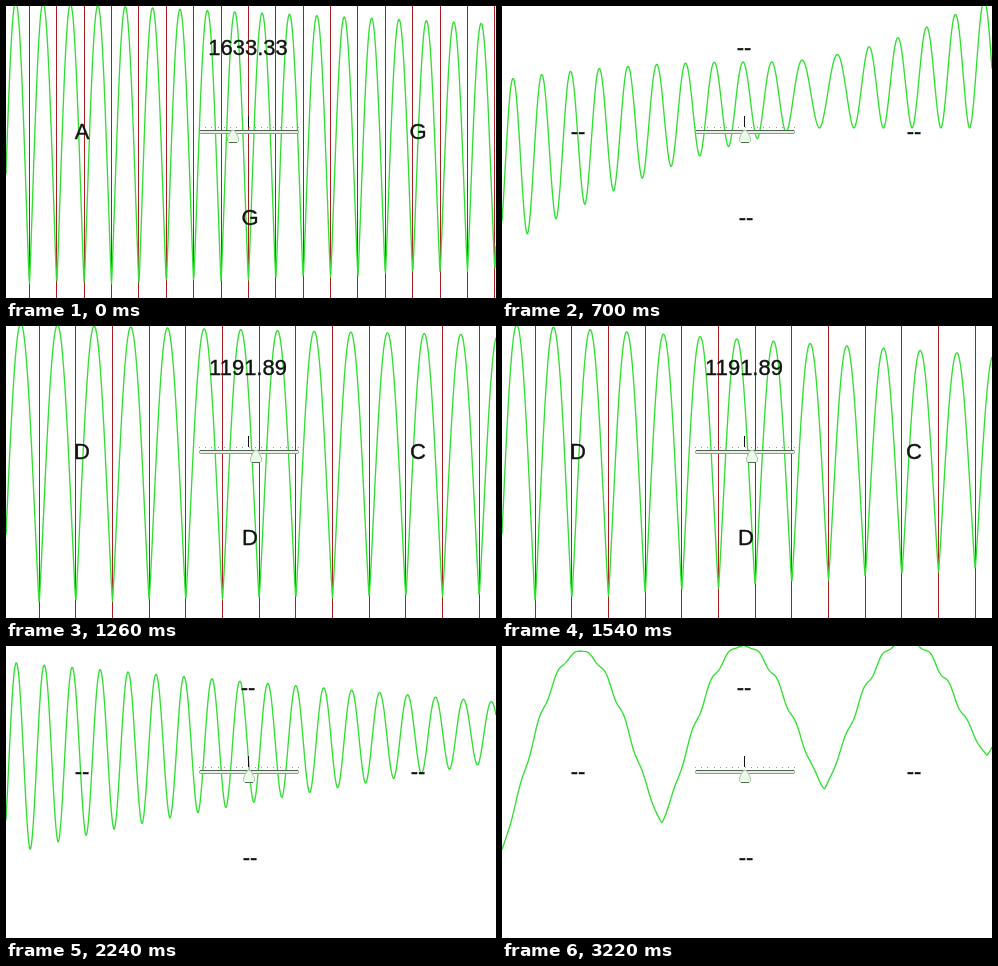
An HTML page with a canvas for the animation above (3.27 s loop, 490 px wide and 292 px high).

```html
<!DOCTYPE html>
<html lang="en">
<head>
<meta charset="utf-8">
<title>Tuner</title>
<style>
  html, body { margin: 0; width: 100%; height: 100%; overflow: hidden; background: #fff; }
  canvas { display: block; }
</style>
</head>
<body>
<canvas id="stage" width="490" height="292"></canvas>
<script>
const W = 490, H = 292, STEP = 140, LOOP = 3270;
const ctx = document.getElementById('stage').getContext('2d');
const { PI, sin, cos, abs, exp, max, min, pow } = Math;

const WAVE = '#33de33', RED = '#a81e22', INK = '#101410', GREEN_INK = '#0c640c';

const clamp = t => max(0, min(1, t));
const smooth = t => t * t * (3 - 2 * t);

// Envelopes take u, the position across the stage from 0 to 1.
const ramp = (a, b, bend = 1) => u => a + (b - a) * pow(u, bend);

// Each wave gives the height y at x; a steady tone also has a period and a first peak.
function tone(period, peak, power, top, bottom, slip = 0) {
  const y = x => {
    const late = slip * smooth(clamp((x - 280) / 85));
    const lift = pow(abs(cos(PI * (x - peak - late) / period)), power);
    const low = bottom(x / W);
    return low + (top(x / W) - low) * lift;
  };
  return { y, period, peak };
}

const loud = (period, peak, top, bottom) => tone(period, peak, 1.15, top, bottom);
const soft = (period, peak, top, bottom) => tone(period, peak, 1.8, top, bottom);

// Two close pitches: a carrier whose swell changes sign at every node.
function beats(node) {
  const y = x => {
    const turn = PI * (x - node) / 180;
    const swell = sin(turn - 0.45 * sin(turn) ** 2);
    const size = 64 + 40 * exp(-x / 12);
    const mid = 48 + 30 * x / W + 8 * swell ** 4 + 60 * exp(-x / 15);
    return mid - size * swell * cos(2 * PI * (x - node - 10) / 10.87);
  };
  return { y };
}

function rippled(base, size) {
  const y = x => {
    const slope = sin(2 * PI * (x - base.peak) / base.period);
    return base.y(x) - size * slope * sin(2 * PI * (x - 137) / 19.1);
  };
  return { y };
}

const highStart = loud(27.38, 9.7, ramp(-5, 18), ramp(279, 264, 1.8));
const highNext = loud(27.38, 9.7, ramp(-6, 25), ramp(278, 256, 1.6));
const highFade = loud(27.48, 9.7, ramp(-6, 32), ramp(277, 247, 1.6));

const calm = soft(28.75, 11, ramp(30, 66), ramp(196, 124, 0.8));
const rise = tone(28.75, 11, 1.8,
  u => 56 + 18 * max(0, 1 - 2 * u) ** 2 - 66 * pow(max(0, u - 0.55) / 0.45, 1.8),
  u => 122 + 120 * pow(max(0, 1 - u / 0.65), 1.5),
  11);

const dStart = loud(36.67, 14.8, ramp(-5, 1), ramp(284, 278));
const dTone = loud(36.67, 14.8, ramp(-3, 9, 0.8), ramp(279, 270, 0.6));
const dNext = loud(36.67, 14.8, ramp(-2, 18), ramp(278, 256));
const dFade = loud(36.67, 14.8, ramp(-2, 29), ramp(278, 242));
const dCalm = soft(36.67, 14.8, ramp(20, 60), ramp(210, 126, 0.8));

const gTone = loud(27.95, 10.3, u => 19 - 22 * (1 - u / 0.72) ** 2, ramp(291, 226, 0.9));
const gFade = loud(27.95, 10.3, ramp(-2, 33, 0.7), ramp(284, 202, 0.9));
const gCalm = soft(27.95, 10.3, ramp(16, 56), ramp(212, 116, 0.8));

const slow = rippled(tone(162.6, 78.5, 1.2, ramp(8, -9), ramp(210, 108)), 3.5);

const HIGH_G = { hz: '1633.33', left: 'A', right: 'G', low: 'G', thumb: 227 };
const D = { hz: '1191.89', left: 'D', right: 'C', low: 'D', thumb: 250 };
const G = { hz: '1575.00', left: 'G', right: 'F', low: 'G', thumb: 243 };
const NONE = { hz: '--', left: '--', right: '--', low: '--', thumb: 243 };

// Each part lasts a number of steps while one wave blends into the next.
const part = (steps, note, from, to = from, ink = INK) => ({ steps, note, from, to, ink });

const parts = [
  part(2, HIGH_G, highStart, highNext),
  part(1, HIGH_G, highFade),
  part(3, NONE, calm, rise),
  part(4, D, dStart, dTone),
  part(2, D, dNext, dFade),
  part(2, NONE, dCalm),
  part(2, G, gTone, gFade),
  part(1, NONE, gCalm),
  part(3, NONE, beats(50), beats(73), GREEN_INK),
  part(4, NONE, beats(110), slow)
];

const scenes = parts.flatMap(p => Array.from({ length: p.steps }, (_, i) => {
  return { ...p, blend: i / max(1, p.steps - 1) };
}));

function drawLines({ peak, period }) {
  ctx.fillStyle = RED;
  for (let x = peak + period / 2; x < W; x += period) {
    ctx.fillRect(Math.floor(x), 0, 1, H);
  }
}

function drawWave({ from, to, blend }) {
  ctx.beginPath();
  for (let x = 0; x <= W; x += 0.5) {
    const y = from.y(x);
    ctx.lineTo(x, y + (to.y(x) - y) * blend);
  }
  ctx.strokeStyle = WAVE;
  ctx.lineWidth = 1.35;
  ctx.lineJoin = 'round';
  ctx.stroke();
}

function drawThumb(x) {
  ctx.beginPath();
  ctx.moveTo(x, 124);
  ctx.lineTo(x + 2, 125);
  ctx.lineTo(x + 5.5, 132);
  ctx.lineTo(x + 5.5, 135);
  ctx.lineTo(x + 4, 136.5);
  ctx.lineTo(x - 4, 136.5);
  ctx.lineTo(x - 5.5, 135);
  ctx.lineTo(x - 5.5, 132);
  ctx.lineTo(x - 2, 125);
  ctx.closePath();
  ctx.fillStyle = '#eef8ec';
  ctx.fill();
  ctx.strokeStyle = '#a4cca0';
  ctx.stroke();
  ctx.fillStyle = '#4c704c';
  ctx.fillRect(x - 4, 136, 8, 1);
}

function drawSlider(x) {
  ctx.fillStyle = '#8da58d';
  for (let i = 0; i <= 16; i++) ctx.fillRect(Math.round(193 + i * 6.2), 121, 1, 1);
  ctx.fillStyle = INK;
  ctx.fillRect(242, 110, 1, 11);

  ctx.beginPath();
  ctx.roundRect(193.5, 124.5, 99, 3, 1);
  ctx.fillStyle = '#e6ede2';
  ctx.fill();
  ctx.lineWidth = 1;
  ctx.strokeStyle = '#8c9c88';
  ctx.stroke();
  ctx.fillStyle = '#4e6050';
  ctx.fillRect(194, 124, 98, 1);
  drawThumb(x);
}

function label(text, x, y) {
  ctx.fillText(text, x, y);
  ctx.strokeText(text, x, y);
}

function drawLabels(note, ink) {
  ctx.font = '22px "Liberation Sans", Arial, sans-serif';
  ctx.textAlign = 'center';
  ctx.fillStyle = ctx.strokeStyle = ink;
  ctx.lineWidth = 0.35;
  label(note.hz, 242, 49);
  label(note.left, 76, 133);
  label(note.right, 412, 133);
  label(note.low, 244, 219);
}

function draw(now) {
  const scene = scenes[min(Math.floor(now % LOOP / STEP), scenes.length - 1)];
  ctx.fillStyle = '#fff';
  ctx.fillRect(0, 0, W, H);
  if (scene.note !== NONE) drawLines(scene.from);
  drawWave(scene);
  drawSlider(scene.note.thumb);
  drawLabels(scene.note, scene.ink);
}

const start = performance.now();
function tick() {
  draw(performance.now() - start);
  requestAnimationFrame(tick);
}
tick();
</script>
</body>
</html>
```
